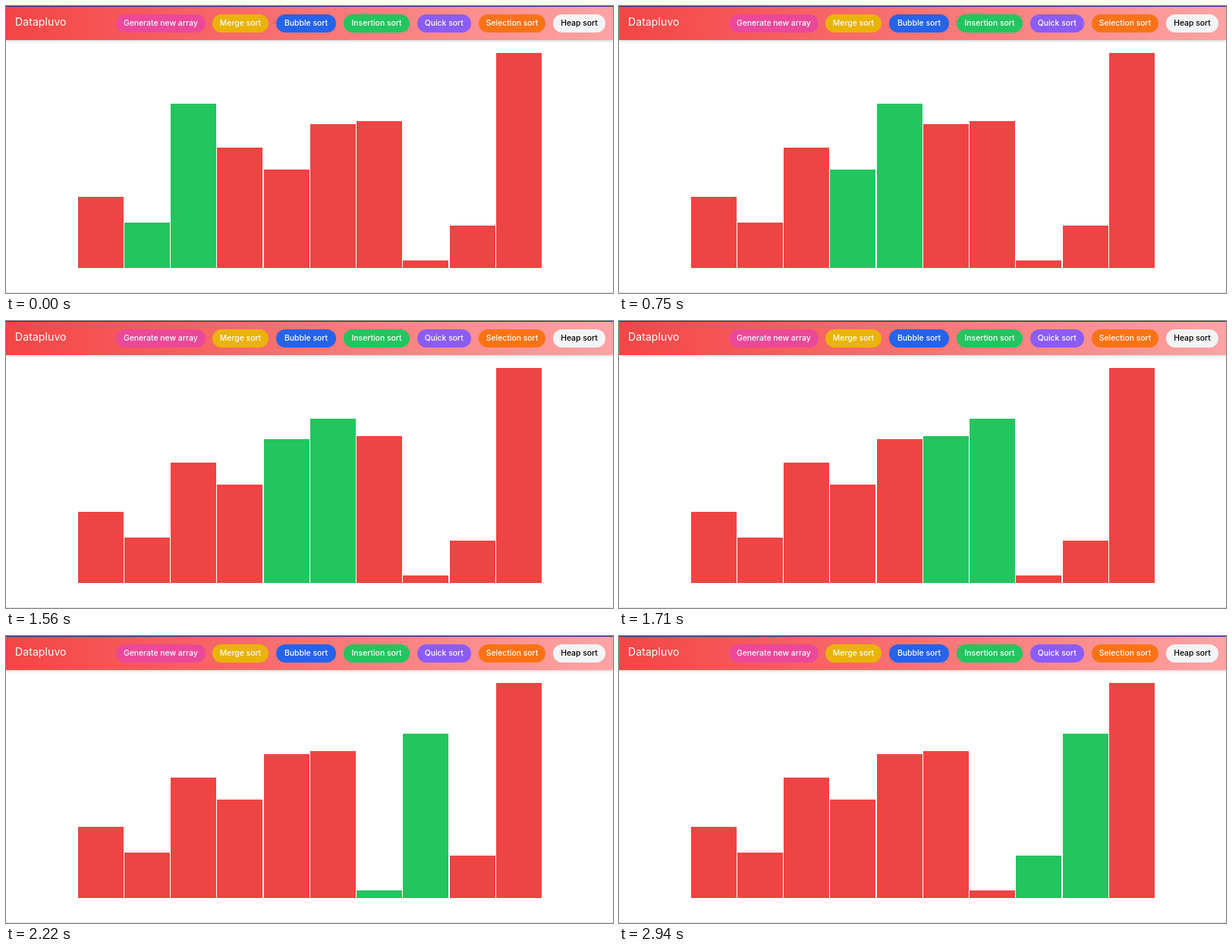
An HTML page for the animation above (2.97 s loop, 800 by 379 pixels).

```html
<!DOCTYPE html>
<html lang="en">
<head>
<meta charset="utf-8">
<title>Sorting</title>
<style>
  html, body { margin: 0; width: 100%; height: 100%; overflow: hidden; background: #fff; }
  body { position: relative; font-family: Inter, "Open Sans", sans-serif; }
  header {
    position: absolute; left: 0; top: 0; width: 800px; height: 45px; box-sizing: border-box;
    border-top: 1px solid #26307c;
    background: linear-gradient(90deg, #f44545, #fda4a4);
    box-shadow: 0 1px 4px rgba(0, 0, 0, .2);
  }
  h1 {
    position: absolute; left: 12px; top: 10px; margin: 0;
    font-size: 14px; font-weight: 400; line-height: 20px; letter-spacing: .1px; color: #fff;
  }
  .pill {
    position: absolute; top: 10px; height: 24px; border-radius: 12px;
    font-size: 10.4px; font-weight: 500; line-height: 24px;
    text-align: center; white-space: nowrap; color: #fff;
  }
  .bar { position: absolute; width: 60px; }
  footer { position: absolute; left: 0; top: 378px; width: 800px; height: 1px; background: #e4e4e4; }
</style>
</head>
<body>
<header><h1>Datapluvo</h1></header>
<footer></footer>
<script>
const LOOP = 2970, STEP = 520, LEAD = 490;
const RED = '#ef4444', GREEN = '#22c55e';
const MOVING = 217, OTHERS = [94, 60, 159, 130, 190, 194, 10, 56, 284];

function add(parent, className) {
  const el = document.createElement('div');
  el.className = className;
  return parent.appendChild(el);
}

const header = document.querySelector('header');
[
  ['Generate new array', 144.5, 118.5, '#ec4899'],
  ['Merge sort', 272, 74, '#eab308'],
  ['Bubble sort', 356, 79, '#2563eb'],
  ['Insertion sort', 445, 87, GREEN],
  ['Quick sort', 541.5, 71.5, '#8b5cf6'],
  ['Selection sort', 623, 88, '#f97316'],
  ['Heap sort', 721, 69, '#f3f4f6', '#000']
].forEach(([label, left, width, background, color = '#fff']) => {
  const pill = add(header, 'pill');
  pill.textContent = label;
  Object.assign(pill.style, { left: left + 'px', width: width + 'px', background, color });
});

const bars = Array.from({ length: 10 }, (_, i) => {
  const bar = add(document.body, 'bar');
  bar.style.left = 94.6 + 61.25 * i + 'px';
  return bar;
});

// Each step swaps the moving bar one place to the right.
function draw(now) {
  const place = Math.floor((now % LOOP + LEAD) / STEP) + 2;
  const heights = [...OTHERS];
  heights.splice(place, 0, MOVING);
  bars.forEach((bar, i) => {
    bar.style.top = 346 - heights[i] + 'px';
    bar.style.height = heights[i] + 'px';
    bar.style.background = i === place || i === place - 1 ? GREEN : RED;
  });
}

const start = performance.now();
function tick() {
  draw(performance.now() - start);
  requestAnimationFrame(tick);
}
tick();
</script>
</body>
</html>
```
